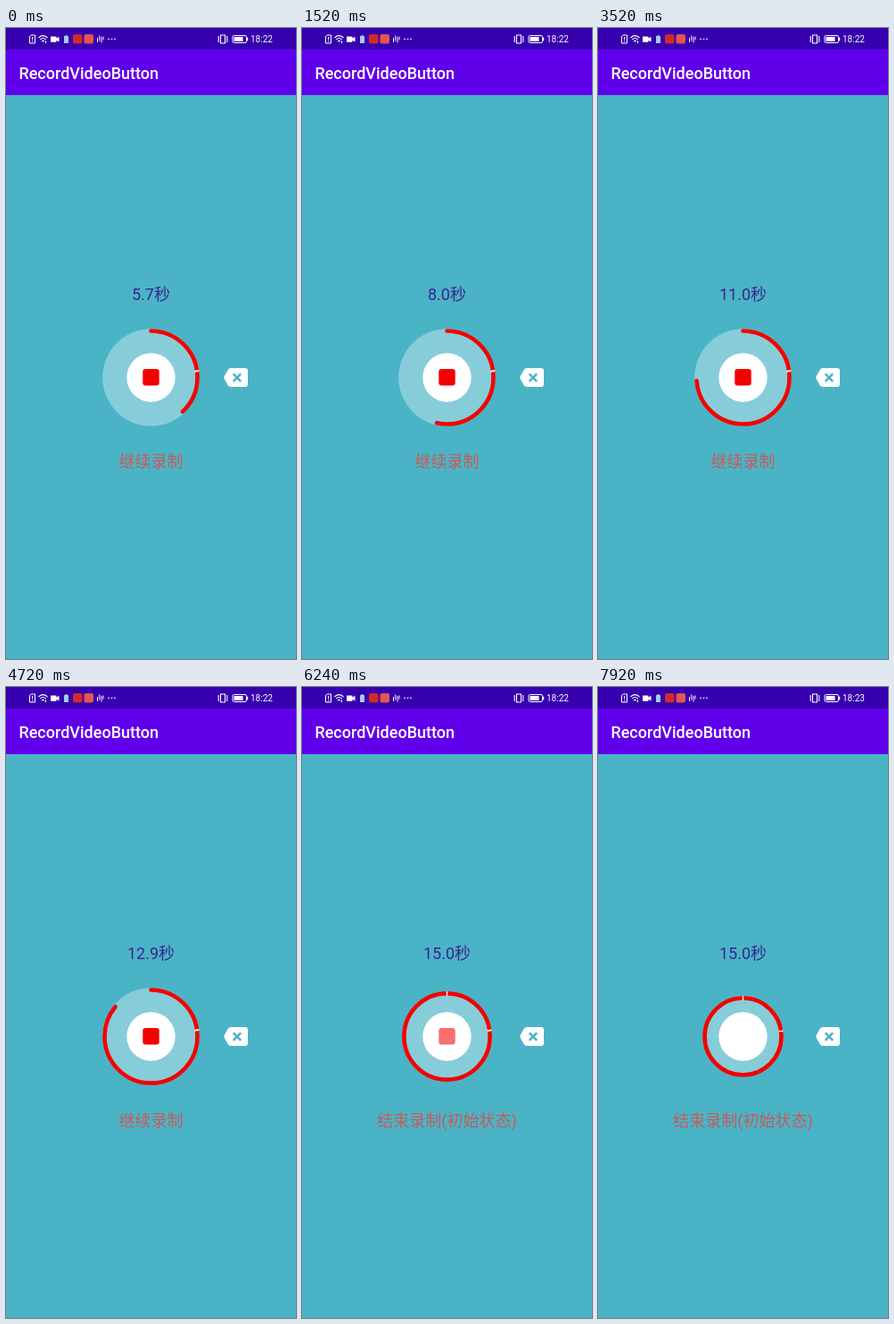
An HTML page that plays this animation: 325x705 px, repeating every 8000 ms.

```html
<!DOCTYPE html>
<html lang="zh-CN">
<head>
<meta charset="utf-8">
<title>RecordVideoButton</title>
<style>
  html, body { margin: 0; width: 100%; height: 100%; overflow: hidden; background: #4ab4c6; }
  svg { display: block; font-family: Roboto, "Noto Sans CJK SC", "Noto Sans CJK", sans-serif; }
  .label { font-size: 18px; text-anchor: middle; }
  .line { fill: none; stroke: #fff; }
</style>
</head>
<body>
<svg width="325" height="705" viewBox="0 0 325 705">
  <rect width="325" height="24" fill="#3700ae"/>
  <rect y="24" width="325" height="51" fill="#6000ea"/>

  <!-- status bar -->
  <g fill="#fff">
    <path class="line" d="M26.5 9.5l2-1.5h4v9h-6zM29.5 10v3.2M29.5 14.2v1.2"/>
    <path class="line" stroke-width="1.1" d="M36.5 11q5-4.6 10 0M38.3 13q3.2-3 6.4 0M40 15q1.5-1.4 3 0M44.5 14.5v2.5"/>
    <path d="M50 9.5h6.5v2l3-1.7v5.6l-3-1.7v2H50z"/>
    <path d="M66.5 8h2v1H70v8h-5V9h1.5z" fill="#a9c6ee"/>
    <rect x="75" y="7" width="10.5" height="10.5" rx="2" fill="#cf2b2b"/>
    <rect x="87.5" y="7" width="10.5" height="10.5" rx="2" fill="#e2564c"/>
    <path class="line" d="M102.5 11v5M104.8 8.5v6M107 10v6.5M109 9.5v4"/>
    <path class="line" stroke-width="1.4" stroke-dasharray="1.6 1.8" d="M114.3 12.4h9"/>
    <path class="line" stroke-width="1.1" d="M240.5 8h5v9h-5zM238.2 9v7M247.8 9v7"/>
    <rect class="line" x="254" y="8.5" width="15.5" height="8" rx="1.6"/>
    <path d="M255.5 10h10v5h-10zM270 10.8h1.2v3.4H270z"/>
    <text id="clock" x="274" y="16" font-size="10"></text>
  </g>
  <text x="14.4" y="56.5" font-size="18" font-weight="500" fill="#fff">RecordVideoButton</text>

  <text id="seconds" class="label" x="162.5" y="304" fill="#3c2592"></text>
  <text id="status" class="label" x="162.5" y="491" fill="#c85a5a"></text>

  <!-- record button -->
  <g transform="translate(162.5 390.5)">
    <circle id="disc" fill="#fff" fill-opacity=".33"/>
    <circle id="ring" fill="none" stroke="#f40000" stroke-width="4.6" stroke-linecap="round"
            pathLength="360" transform="rotate(-90)"/>
    <path id="startTick" class="line" stroke-width="1.4"/>
    <path id="pauseTick" class="line" stroke-width="2" transform="rotate(82)"/>
    <circle r="27.2" fill="#fff"/>
    <rect id="stop" x="-9.2" y="-9.4" width="18.4" height="18.4" rx="3" fill="#f40000"/>
  </g>

  <!-- delete button -->
  <path d="M244.8 388.8l4-7q1-1.8 3-1.8H268q3 0 3 3v15q0 3-3 3H251.8q-2 0-3-1.8l-4-7q-1-1.7 0-3.4z" fill="#fff"/>
  <path d="M254.8 386.4l8.4 8.4m0-8.4l-8.4 8.4" stroke="#4ab4c6" stroke-width="2.5"/>
</svg>
<script>
  const LOOP = 8000, LIMIT = 15, START = 5.71, RATE = 1.525 / 1000;
  const SHRINK_AT = 6150, SHRINK_TIME = 200, CLOCK_AT = 7120;
  const el = id => document.getElementById(id);
  const set = (id, attrs) => {
    for (const key in attrs) el(id).setAttribute(key, attrs[key]);
  };
  const clamp = x => Math.min(1, Math.max(0, x));
  const ease = x => (1 - Math.cos(Math.PI * x)) / 2;

  function draw(t) {
    const value = Math.min(LIMIT, START + t * RATE);
    const done = value === LIMIT;
    const shrink = ease(clamp((t - SHRINK_AT) / SHRINK_TIME));
    const radius = 54.3 - 9 * shrink;
    const tick = `M0 ${-radius}v5`;

    el('seconds').textContent = (Math.floor(value * 10) / 10).toFixed(1) + '秒';
    el('status').textContent = done ? '结束录制(初始状态)' : '继续录制';
    el('clock').textContent = t < CLOCK_AT ? '18:22' : '18:23';

    set('disc', { r: radius });
    set('ring', {
      r: radius - 2.3,
      'stroke-dasharray': done ? 'none' : `${value / LIMIT * 360} 400`
    });
    set('startTick', { d: tick, opacity: done ? 1 : 0 });
    set('pauseTick', { d: tick, 'stroke-width': 2 - 0.6 * shrink });
    set('stop', { opacity: 1 - shrink });
  }

  function frame() {
    draw(performance.now() % LOOP);
    requestAnimationFrame(frame);
  }
  frame();
</script>
</body>
</html>
```
